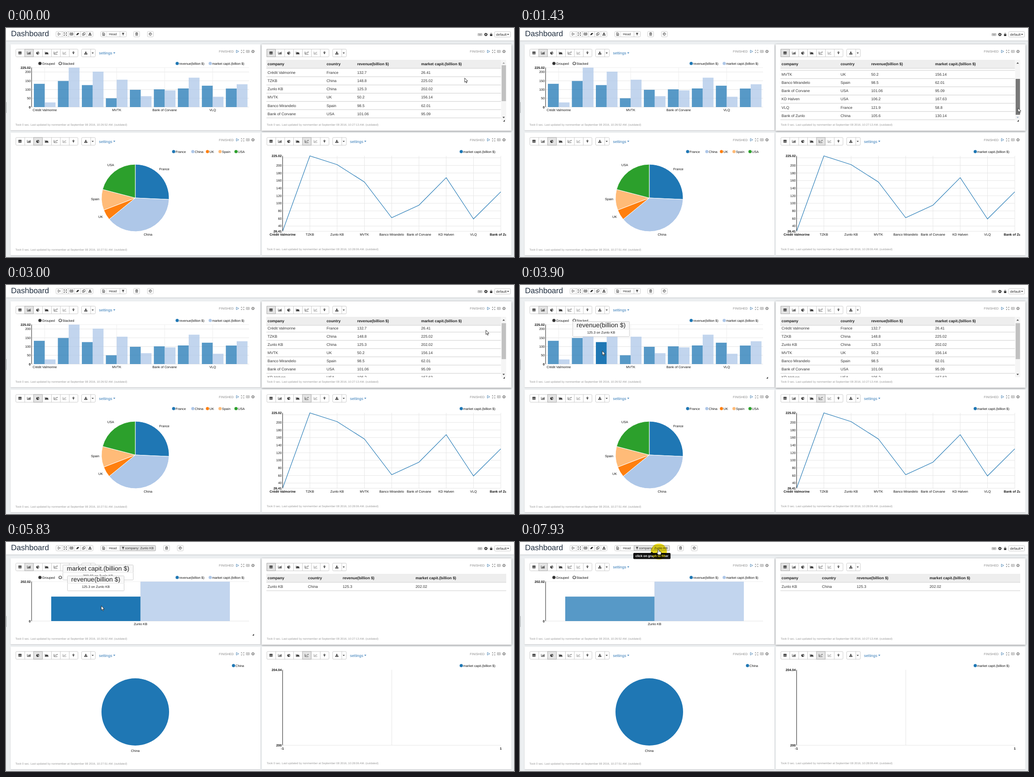
These frames come from a looping animation (1112x504 px, 8 s). An HTML page:

```html
<!DOCTYPE html>
<html lang="en">
<head>
<meta charset="utf-8">
<title>Dashboard</title>
<style>
  html, body { margin: 0; width: 100%; height: 100%; overflow: hidden; background: #eceff1; }
  svg { display: block; width: 100vw; height: 100vh; }
  text { font-family: "Liberation Sans", Arial, sans-serif; text-rendering: geometricPrecision; white-space: pre; }
  .panel { filter: drop-shadow(0 1px 1px rgba(0,0,0,.16)); }
  .raised { filter: drop-shadow(0 1px 2px rgba(0,0,0,.42)); }
  .glow { mix-blend-mode: multiply; }
</style>
</head>
<body>
<svg id="stage" viewBox="0 0 1112 504" xmlns="http://www.w3.org/2000/svg"></svg>
<script>
const LOOP = 8000;
const BLUE = '#1f77b4', PALE = '#aec7e8', GRID = '#e6e6e6', LINK = '#337ab7';
const REV = 'revenue(billion $)', CAP = 'market capit.(billion $)';
const ROWS = [
  ['Crédit Valmorine', 'France', 132.7, 26.41],
  ['TZKB', 'China', 148.8, 225.02],
  ['Zunlo KB', 'China', 125.3, 202.02],
  ['MVTK', 'UK', 50.2, 156.14],
  ['Banco Mirandelo', 'Spain', 98.5, 62.01],
  ['Bank of Corvane', 'USA', 101.06, 95.09],
  ['KD Halven', 'USA', 106.2, 167.63],
  ['VLQ', 'France', 121.9, 58.8],
  ['Bank of Zunlo', 'China', 105.6, 130.14]
];
const PICK = ROWS[2];
const COUNTRIES = [['France', BLUE, 367], ['China', PALE, 409], ['UK', '#ff7f0e', 441],
  ['Spain', '#ffbb78', 468.5], ['USA', '#2ca02c', 503.5]];

// Each step changes only the listed parts of the state.
const STEPS = [
  [0, { cur: [1004, 110], thumb: '#c1c1c1', scroll: 0, tips: [], grip: 1090 }],
  [70, { cur: [1087.5, 109] }],
  [220, { cur: [1092, 105], thumb: '#a8a8a8' }],
  [630, { glow: [1097.5, 110.5] }],
  [850, { glow: null, thumb: '#787878' }],
  [1100, { cur: [1092, 127], scroll: 36 }],
  [1430, { cur: [1090, 176], scroll: 50.3 }],
  [1760, { cur: [1092, 162] }],
  [2100, { cur: [1094, 139] }],
  [2350, { cur: [1094, 120], scroll: 25 }],
  [2530, { cur: [1088, 100], scroll: 3.5, thumb: '#c1c1c1' }],
  [3000, { cur: [1050.5, 99.5] }],
  [3380, { cur: [440, 118], grip: 541 }],
  [3480, { cur: [204, 138], tips: ['cap'], hot: 'cap' }],
  [3900, { cur: [180, 145], tips: ['rev'], hot: 'rev' }],
  [4110, { cur: [214, 147], tips: ['cap'] }],
  [4520, { cur: [208.5, 140.5], hot: 'cap' }],
  [5830, { filtered: true, tips: ['cap', 'revOne'], hot: 'rev' }],
  [7050, { cur: [273, 206], tips: [], hot: null }],
  [7170, { cur: [316, 130], grip: 0 }],
  [7340, { cur: [322, 60] }],
  [7410, { cur: [325, 17] }],
  [7650, { cur: [316, 17] }],
  [7730, { cur: [303, 16], hand: true }],
  [7930, { glow: [304, 21], hint: true }]
];

const rect = (x, y, w, h, fill, more = '') =>
  `<rect x="${x}" y="${y}" width="${w}" height="${h}" fill="${fill}" ${more}/>`;
const path = (d, fill, more = '') => `<path d="${d}" fill="${fill}" ${more}/>`;
const line = (x1, y1, x2, y2, c = GRID, w = 1) =>
  path(`M${x1} ${y1}L${x2} ${y2}`, 'none', `stroke="${c}" stroke-width="${w}"`);
const dot = (x, y, r, fill, more = '') => `<circle cx="${x}" cy="${y}" r="${r}" fill="${fill}" ${more}/>`;
const text = (x, y, s, size = 7.2, fill = '#111', anchor = 'start', bold = false) =>
  `<text x="${x}" y="${y}" font-size="${size}" fill="${fill}" text-anchor="${anchor}" ${bold ? 'font-weight="700"' : ''}>${s}</text>`;
const mid = (x, y, s, bold) => text(x, y, s, 7.2, '#111', 'middle', bold);
const end = (x, y, s, bold) => text(x, y, s, 7.2, '#111', 'end', bold);
const box = (x, y, w, h, on) =>
  rect(x + .5, y + .5, w - 1, h - 1, on ? '#e4e4e4' : '#fff', `rx="2" stroke="${on ? '#adadad' : '#ccc'}"`);
const caret = (x, y, c = '#333') => path(`M${x - 2.3} ${y - 1}h4.6l-2.3 2.6z`, c);

// Icons: [filled path, stroked path], centred on the origin.
const ICONS = {
  table: ['M-3.2-3h6.4v1.6h-6.4z', 'M-3-2.7h6v5.4h-6zM-3-.6h6M-3 1.1h6M-1-2.7v5.4M1-2.7v5.4'],
  bars: ['M-2 0h1.1v2h-1.1zM-.4-2h1.1v4h-1.1zM1.2-1h1.1v3h-1.1zM2.7-2.7h1v4.7h-1z', 'M-3.6-3v5.8h7.6'],
  pie: ['M-.3.2V-3a3.2 3.2 0 1 0 2.3 5.5zM.5-.5V-3.2a3 3 0 0 1 2.7 2.7zM.8.4h2.5a3 3 0 0 1-.8 1.8z', ''],
  area: ['M-3 2V0l2-2.5L.8-.5 2.4-2 3.8 2z', 'M-3.6-3v5.8h7.6'],
  line: ['M2-2.8h2v2z', 'M-3.6-3v5.8h7.6M-2.8 1.2l2-2 1.3 1L3.4-2.2'],
  scatter: ['M-2-1h1v1h-1zM0 .6h1v1H0zM2-.8h1v1H2z', 'M-3.6-3v5.8h7.6M-2.6 1.6L3.4-2.4'],
  pin: ['M0 3.3C-.6 1.3-2-.1-2-1.2a2 2 0 0 1 4 0C2-.1.6 1.3 0 3.3zM0-2a.8.8 0 1 0 .01 0z', ''],
  load: ['M-.9-3.2H.9v2.4h1.7L0 1.7-2.6-.8h1.7zM-3.4 1.1h1.6l1 1h1.6l1-1h1.6v2.1h-6.8z', ''],
  play: ['', 'M-2.3-2.9L2.9 0-2.3 2.9z'],
  expand: ['M-3.4-3.4h2.5l-2.5 2.5zM3.4-3.4v2.5L.9-3.4zM-3.4 3.4V.9l2.5 2.5zM3.4 3.4H.9l2.5-2.5z', 'M-2.7-2.7l1.9 1.9M2.7-2.7L.8-.8M-2.7 2.7L-.8.8M2.7 2.7L.8.8'],
  book: ['', 'M0-2.2v5M0-2.2Q-1.6-3.2-3.4-2.5v5Q-1.6 1.8 0 2.8 1.6 1.8 3.4 2.5v-5Q1.6-3.2 0-2.2M-2.6-1h1.7M-2.6.5h1.7M.9-1h1.7M.9.5h1.7'],
  erase: ['M-3.6 2.3L-.3-2.2h3.9L.4 2.3z', ''],
  copy: ['', 'M-.8-3h3.6v4.2H-.8zM-.8-1.2h-2.2v4.2H.6V1.2'],
  file: ['', 'M-2.4-3.2h3l1.8 1.8v4.6h-4.8zM-1.2-.8h2.4M-1.2.6h2.4M-1.2 1.9h2.4'],
  filter: ['M-2.9-2.8h5.8L.8-.2v3.2L-.8 1.8v-2z', ''],
  trash: ['', 'M-2.8-2.2h5.6M-1-2.2v-1h2v1M-2.1-2.2v5.2h4.2v-5.2M-.7-.9v2.7M.7-.9v2.7'],
  clock: ['', 'M0-2.8a2.8 2.8 0 1 0 .01 0zM0-1.6V.3h-1.3'],
  lock: ['M-2.5-.5h5v3.7h-5z', 'M-1.5-.5v-1a1.5 1.5 0 0 1 3 0v1'],
  keys: ['', 'M-4.4-2.3h8.8v4.6h-8.8zM-3.4-.9h6.8M-3.4.2h6.8M-2 1.3h4']
};
function icon(name, x, y, c = '#333', w = .8) {
  if (name === 'gear') {
    return dot(x, y, 2.1, 'none', `stroke="${c}" stroke-width="1.5"`) +
      dot(x, y, 3.1, 'none', `stroke="${c}" stroke-width="1.1" stroke-dasharray="1.22"`);
  }
  const [solid, wire] = ICONS[name];
  return `<g transform="translate(${x} ${y})">${path(solid, c, 'fill-rule="evenodd"')}${path(wire, 'none', `stroke="${c}" stroke-width="${w}"`)}</g>`;
}

function header(s) {
  let o = rect(0, 0, 1112, 27.5, '#fff', 'class="panel"') + text(11, 17.5, 'Dashboard', 17, '#212f40');
  o += box(109, 7, 82, 13);
  ['play', 'expand', 'book', 'erase', 'copy', 'load'].forEach((n, i) => {
    const x = 109.5 + i * 13.5;
    if (i) o += line(x, 7, x, 20, '#ccc');
    o += icon(n, x + 6.8, 13.3);
  });
  const shift = s.filtered ? 65.5 : 0;
  o += box(207, 7, 57 + shift * .97, 13) + line(220.5, 7, 220.5, 20, '#ddd') + icon('file', 213.8, 13.4);
  o += text(225.3, 16, 'Head', 7.2, '#333');
  o += s.filtered ? box(249, 7, 79, 13, true) + text(260.5, 16, 'company: ' + PICK[0], 7.2, '#333')
    : line(249.5, 7, 249.5, 20, '#ccc');
  o += icon('filter', 256.3, 13.5);
  o += box(279 + shift, 7, 14, 13) + icon('trash', 286 + shift, 13.3);
  o += box(309 + shift, 7, 14, 13) + icon('clock', 316 + shift, 13.3, '#333', 1);
  o += icon('keys', 1037.5, 14.5, '#888') + icon('gear', 1050.5, 14.3, '#222') + icon('lock', 1062, 14.3, '#222');
  return o + box(1069, 7.5, 36, 13) + text(1072.8, 16.6, 'default', 7.7, '#333') + caret(1099, 14);
}

function panel(x, y, h, active, time, settings) {
  let o = rect(x, y, 547, h, '#fff', `class="${active ? 'panel' : 'raised'}"`);
  const bx = x + 11, by = y + 10, cy = by + 9;
  o += box(bx, by, 137, 18);
  ['table', 'bars', 'pie', 'area', 'line', 'scatter', 'pin'].forEach((n, i) => {
    const px = bx + i * 19.5;
    if (i === active) o += rect(px + .5, by + .5, 19, 17, '#e4e4e4', 'stroke="#adadad"');
    else if (i) o += line(px + .5, by, px + .5, by + 18, '#ccc');
    o += icon(n, px + 9.6, cy, n === 'scatter' ? '#888' : '#333');
  });
  o += box(x + 155, by, 31, 18) + line(x + 175.5, by, x + 175.5, by + 18, '#ccc');
  o += icon('load', x + 164.7, cy) + caret(x + 179.8, cy);
  if (settings) o += text(x + 193.5, cy + 3, 'settings', 8.4, LINK) + caret(x + 227, cy - .3, LINK);
  const right = x === 10 ? 0 : 2.6;
  o += text(x + 456 - (right ? .3 : 0), y + 18.3, 'FINISHED', 7, '#8c8c8c');
  o += icon('play', x + 496.5, y + 15.6, '#3071a9');
  ['expand', 'book', 'gear'].forEach((n, i) => o += icon(n, x + 508 + i * 11.3, y + 15.6, '#8a8a8a', .7));
  const foot = y < 100 ? 215 : x < 100 ? 490 : 489;
  return o + text(x + (right ? 11.2 : 10.5), foot,
    `Took 0 sec. Last updated by nonmember at September 08 2016, ${time} AM. (outdated)`, 6.2, '#999');
}

const legend = (x, y, s, c) => dot(x, y, 3.5, c) + text(x + 4.3, y + 2.6, s);

function barChart(s) {
  const rows = s.filtered ? [PICK] : ROWS, max = s.filtered ? 202.02 : 225.02, k = 86.8 / max;
  const x0 = s.filtered ? 99 : 61, w = s.filtered ? 195.5 : 23.7, gap = 52.53;
  let o = dot(74.3, 78, 3.5, '#333') + text(79, 80.6, 'Grouped');
  o += dot(118.8, 78, 3, '#fff', 'stroke="#333" stroke-width="1.2"') + text(123.5, 80.6, 'Stacked');
  o += legend(374.7, 78, REV, BLUE) + legend(447, 78, CAP, PALE);
  o += line(56, 174, 532, 174) + line(56, 87.2, 532, 87.2, '#eee') + end(54, 89.8, max, true) + end(54, 176.5, 0, true);
  if (!s.filtered) {
    for (let v = 50; v <= 200; v += 50) {
      const y = 174 - v * k;
      o += line(56, y, 532, y) + end(54, y + 2.5, v);
    }
  }
  rows.forEach((r, i) => {
    const x = x0 + gap * i, label = s.filtered || [0, 3, 5, 7].includes(i);
    if (label) o += line(x + w, 87, x + w, 174, '#eee') + mid(x + w, 183.2, r[0]);
    [['rev', r[2], BLUE], ['cap', r[3], PALE]].forEach(([key, v, c], j) => {
      const full = s.hot === key && r === PICK;
      o += rect(x + j * w, 174 - v * k, w, v * k, c, `fill-opacity="${full ? 1 : .75}"`);
    });
  });
  return o + line(56, 87, 56, 174, '#333', 1.1);
}

function table(s) {
  const cols = s.filtered ? [572.5, 661, 737, 896.5] : [572.5, 701.7, 768.7, 908.7];
  const right = s.filtered ? 1095 : 1083.5, rows = s.filtered ? [PICK] : ROWS;
  const off = s.filtered ? 0 : s.scroll;
  let o = '<clipPath id="body"><rect x="570" y="89" width="526" height="114"/></clipPath><g clip-path="url(#body)">';
  rows.forEach((r, i) => {
    const y = 101 + 18.13 * i - off;
    r.forEach((v, j) => o += text(cols[j], y, v, 8.3, '#333'));
    o += line(570, y + 6.2, right, y + 6.2, '#ccc');
  });
  o += '</g>' + rect(570, 70, right - 570, 18.5, '#eee') + line(570, 88.8, right, 88.8, '#ccc');
  ['company', 'country', REV, CAP].forEach((h, j) => o += text(cols[j], 82, h, 8.4, '#222', 'start', true));
  if (s.filtered) return o;
  const top = 82 + off * 30 / 50.3;
  o += rect(1084, 70, 11, 133, '#f5f5f5') + rect(1085, top, 9.5, 79, s.thumb);
  o += path('M1086.8 78.5h5.2l-2.6-3z', off ? '#444' : '#999');
  return o + path('M1086.8 195.5h5.2l-2.6 3z', off > 50 ? '#a3b4c8' : '#444');
}

function pieChart(s) {
  const cx = 283, cy = 374, r = 74;
  if (s.filtered) return legend(498, 272, 'China', BLUE) + dot(cx, cy, r, BLUE) + mid(cx, 462, 'China');
  const total = ROWS.reduce((n, row) => n + row[2], 0);
  const at = (a, d) => [cx + d * Math.sin(a), cy - d * Math.cos(a)];
  let a = 0, o = '';
  for (const [name, color, lx] of COUNTRIES) {
    const part = ROWS.filter(row => row[1] === name).reduce((n, row) => n + row[2], 0) / total;
    const b = a + part * 2 * Math.PI, [tx, ty] = at((a + b) / 2, 88);
    o += path(`M${cx} ${cy}L${at(a, r)}A${r} ${r} 0 0 1 ${at(b, r)}Z`, color, 'stroke="#fff" stroke-width="1"');
    o += mid(tx, ty, name) + legend(lx, 272, name, color);
    a = b;
  }
  return o;
}

function lineChart(s) {
  const top = 281.5, base = 447.3, x0 = 605.5, x1 = 1083;
  let o = legend(996.5, 272, CAP, BLUE);
  if (s.filtered) {
    o += line(x0, base, x1, base) + line(844.5, top, 844.5, base) + end(603.5, 284, '204.04', true) + end(603.5, 450, 200, true);
    o += mid(605, 457.2, '-1', true) + mid(1083, 457.2, '1', true);
  } else {
    const y = v => base - (v - 26.41) * (base - top) / 198.61;
    const x = i => x0 + i * (x1 - x0) / 8;
    for (let v = 40; v <= 220; v += 20) {
      o += line(x0, y(v), x1, y(v)) + (v < 220 ? end(603.5, y(v) + 2.5, v) : '');
    }
    o += line(x0, base, x1, base);
    o += '<clipPath id="plot"><rect x="570" y="260" width="525" height="210"/></clipPath><g clip-path="url(#plot)">';
    ROWS.forEach((r, i) => o += line(x(i), top, x(i), base) + mid(x(i), 457.2, r[0], i % 8 === 0));
    o += '</g>' + end(603.5, 284, '225.02', true) + end(603.5, 450, '26.41', true);
    o += path('M' + ROWS.map((r, i) => `${x(i)} ${y(r[3])}`).join('L'), 'none', `stroke="${BLUE}" stroke-width="1.1"`);
  }
  return o + line(x0, top, x0, base, '#333', 1.1);
}

function tip(kind) {
  const cap = kind === 'cap', w = cap ? 155 : 125;
  const [x, y] = { cap: [124, 50], rev: [115, 80], revOne: [134, 74] }[kind];
  return rect(x + .5, y + .5, w - 1, 33, '#fff', 'stroke="#ccc" rx="1"') + rect(x + 1, y + 1, w - 2, 16, '#f8f8f8') +
    line(x, y + 17.5, x + w, y + 17.5, '#ececec') +
    text(x + w / 2, y + 13.4, cap ? CAP : REV, 14, '#222', 'middle') +
    text(x + w / 2, y + 27.2, `${PICK[cap ? 3 : 2]} on ${PICK[0]}`, 7.4, '#222', 'middle');
}

function overlay(s) {
  let o = s.tips.map(tip).join('');
  if (s.grip) o += path(`M${s.grip + 2} 202v4h-4z`, '#444');
  if (s.hint) {
    o += rect(248, 24, 81.5, 13.5, '#111', 'rx="2"') + path('M285.5 24.2l3-3 3 3z', '#111');
    o += text(288.7, 33.4, 'click on graph to filter', 6.9, '#fff', 'middle', true);
  }
  if (s.glow) o += dot(...s.glow, 17.5, '#efdf1c', 'class="glow"');
  const shape = s.hand
    ? 'M-1.2.9Q0-.7 1.2.9V4.4Q4.6 4.5 6 6V9L5 12H-.5L-3.6 7.6Q-3.3 6-1.2 7.6Z'
    : 'M0 0V9.4L2.2 7.4 3.7 11 5.2 10.3 3.7 6.9H6.7Z';
  return o + `<g transform="translate(${s.cur})">${path(shape, '#fff', 'stroke="#222" stroke-width=".9"')}</g>`;
}

function scene(s) {
  return rect(0, 0, 1112, 504, '#eceff1') + header(s) + rect(0, 163, 1.3, 24, '#b5b9bc') +
    panel(10, 36, 189, 1, '10:26:52', true) + panel(559.5, 36, 190, 0, '10:27:13', false) +
    panel(10, 230.5, 269.5, 2, '10:27:51', true) + panel(559.5, 230.5, 269.5, 4, '10:28:06', true) +
    barChart(s) + table(s) + pieChart(s) + lineChart(s) + overlay(s);
}

const stage = document.getElementById('stage');
let shown = -1;
function draw(now) {
  const t = now % LOOP, past = STEPS.filter(step => step[0] <= t);
  if (past.length !== shown) {
    shown = past.length;
    stage.innerHTML = scene(Object.assign({}, ...past.map(step => step[1])));
  }
}

const start = performance.now();
function tick() {
  draw(performance.now() - start);
  requestAnimationFrame(tick);
}
tick();
</script>
</body>
</html>
```
